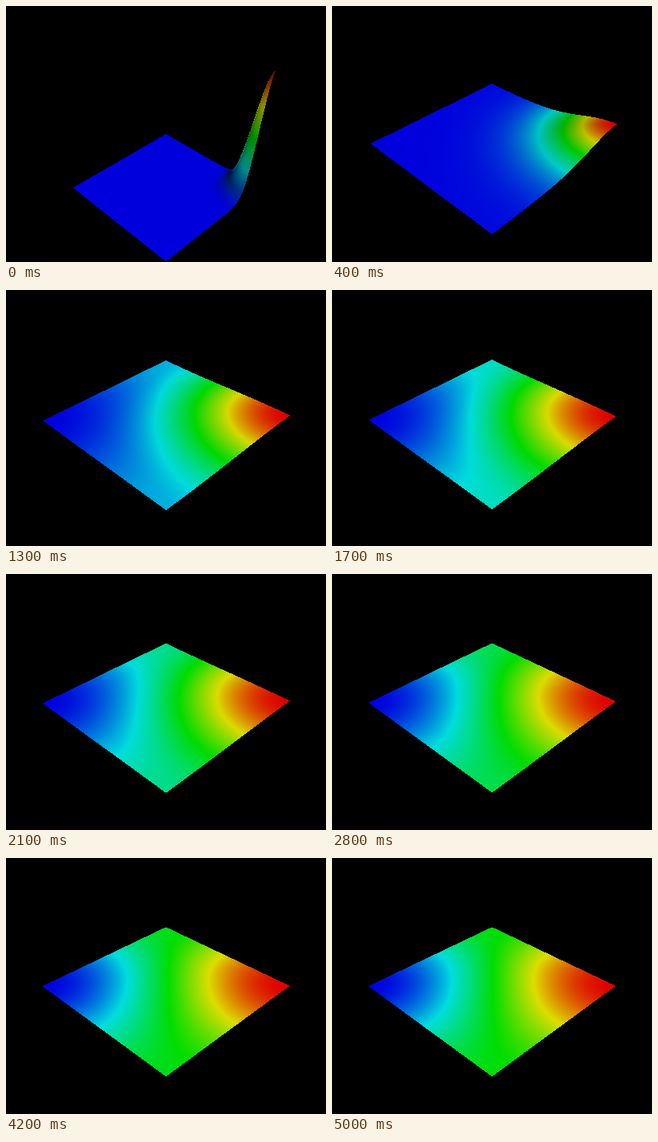
Recreate the animation shown at these times as an HTML page with a canvas. Size 400 by 320 pixels, loop 5.1 s.

```html
<!DOCTYPE html>
<html lang="en">
<head>
<meta charset="utf-8">
<title>Heat diffusion on a square plate</title>
<style>
  html, body { margin: 0; width: 400px; height: 320px; overflow: hidden; background: #000; }
  canvas { display: block; }
</style>
</head>
<body>
<canvas id="stage" width="400" height="320"></canvas>
<script>
const W = 400, H = 320, STEPS = 51, STEP_MS = 100;
const N = 50, ROW = N + 1, MODES = 16;
const SIGMA = 0.1, KAPPA = Math.PI ** 2 * 0.01;
const VIEW = Math.PI / 12, FOCAL = H / 2 / Math.tan(VIEW);
const SIN = Math.sqrt(1 / 3), COS = Math.sqrt(2 / 3);
// direction in camera space (right, up, towards viewer) and intensity
const LIGHTS = [
  [0.5, Math.SQRT1_2, 0.5, 1],
  [-0.75, -0.5, 0.433, 0.6],
  [0.75, -0.5, 0.433, 0.5]
];

const ctx = document.getElementById('stage').getContext('2d');
const image = ctx.createImageData(W, H);
const pixels = new Uint32Array(image.data.buffer);
const zbuf = new Float32Array(W * H);
const heat = new Float64Array(ROW * ROW);
const basis = Array.from({ length: MODES }, (_, m) =>
  Array.from({ length: ROW }, (_, i) => Math.cos(Math.PI * m * i / N)));
const weight = basis.map((_, m) => SIGMA * Math.sqrt(Math.PI / 2) *
  (m ? 2 : 1) * Math.exp(-((Math.PI * m * SIGMA) ** 2) / 2));
const clamp = x => Math.max(0, Math.min(1, x));

// Insulated plate: cosine modes, each damped by implicit time steps
function solve(step) {
  heat.fill(0);
  for (let m = 0; m < MODES; m++) {
    for (let j = 0; j < ROW; j++) {
      let sum = 0;
      for (let n = 0; n < MODES; n++) {
        sum += weight[n] * basis[n][j] * (1 + KAPPA * (m * m + n * n)) ** -step;
      }
      for (let i = 0; i < ROW; i++) heat[i * ROW + j] += weight[m] * basis[m][i] * sum;
    }
  }
}

function slope(i, j, di, dj) {
  const lo = Math.max(0, (di ? i : j) - 1), hi = Math.min(N, (di ? i : j) + 1);
  const at = k => di ? heat[k * ROW + j] : heat[i * ROW + k];
  return (at(hi) - at(lo)) * N / (hi - lo);
}

function shade(i, j) {
  const a = slope(i, j, 1, 0), b = slope(i, j, 0, 1);
  const nx = (a + b) * Math.SQRT1_2, nw = (b - a) * Math.SQRT1_2;
  const len = Math.hypot(nx, nw, 1);
  let n = [nx / len, (COS - nw * SIN) / len, (SIN + nw * COS) / len];
  if (n[2] < 0) n = n.map(x => -x);
  return LIGHTS.reduce((sum, [x, y, z, power]) =>
    sum + power * Math.max(0, n[0] * x + n[1] * y + n[2] * z), 0);
}

function project() {
  const min = heat.reduce((p, q) => Math.min(p, q)), max = heat.reduce((p, q) => Math.max(p, q));
  const half = (max - min) * Math.SQRT1_2;
  const dist = Math.hypot(1, half) / Math.sin(VIEW);
  const points = [];
  for (let i = 0; i < ROW; i++) {
    for (let j = 0; j < ROW; j++) {
      const u = heat[i * ROW + j], near = (i - j) / N;
      const z = Math.SQRT2 * (u - (min + max) / 2);
      const scale = 1 / (dist - z * SIN - near * COS);
      points.push({
        x: W / 2 + FOCAL * (1 - (i + j) / N) * scale,
        y: H / 2 - FOCAL * (z * COS - near * SIN) * scale,
        z: scale,
        v: (u - min) / (max - min),
        l: shade(i, j)
      });
    }
  }
  return points;
}

function color(v, light) {
  const k = 255 * Math.min(1, light), t = 4 * v - 2;
  const r = clamp(t) * k, g = clamp(2 - Math.abs(t)) * k, b = clamp(-t) * k;
  return (255 << 24 | Math.round(b) << 16 | Math.round(g) << 8 | Math.round(r)) >>> 0;
}

function triangle(p, q, r) {
  const area = (q.x - p.x) * (r.y - p.y) - (r.x - p.x) * (q.y - p.y);
  if (!area) return;
  const first = (a, b, c) => Math.max(0, Math.ceil(Math.min(a, b, c) - 0.5));
  const last = (a, b, c, size) => Math.min(size - 1, Math.floor(Math.max(a, b, c) - 0.5));
  const x0 = first(p.x, q.x, r.x), x1 = last(p.x, q.x, r.x, W);
  const y0 = first(p.y, q.y, r.y), y1 = last(p.y, q.y, r.y, H);
  for (let y = y0; y <= y1; y++) {
    for (let x = x0; x <= x1; x++) {
      const dx = x + 0.5 - p.x, dy = y + 0.5 - p.y;
      const b = (dx * (r.y - p.y) - (r.x - p.x) * dy) / area;
      const c = ((q.x - p.x) * dy - dx * (q.y - p.y)) / area;
      const a = 1 - b - c;
      if (a < -1e-6 || b < -1e-6 || c < -1e-6) continue;
      const z = a * p.z + b * q.z + c * r.z, at = y * W + x;
      if (z <= zbuf[at]) continue;
      zbuf[at] = z;
      pixels[at] = color(a * p.v + b * q.v + c * r.v, a * p.l + b * q.l + c * r.l);
    }
  }
}

function draw(step) {
  solve(step);
  pixels.fill(0xff000000);
  zbuf.fill(0);
  const pts = project();
  for (let i = 0; i < N; i++) {
    for (let j = 0; j < N; j++) {
      const k = i * ROW + j;
      triangle(pts[k], pts[k + ROW], pts[k + ROW + 1]);
      triangle(pts[k], pts[k + ROW + 1], pts[k + 1]);
    }
  }
  ctx.putImageData(image, 0, 0);
}

let shown = -1;
const start = performance.now();
function tick() {
  const step = Math.floor((performance.now() - start) / STEP_MS) % STEPS;
  if (step !== shown) draw(shown = step);
  requestAnimationFrame(tick);
}
tick();
</script>
</body>
</html>
```
